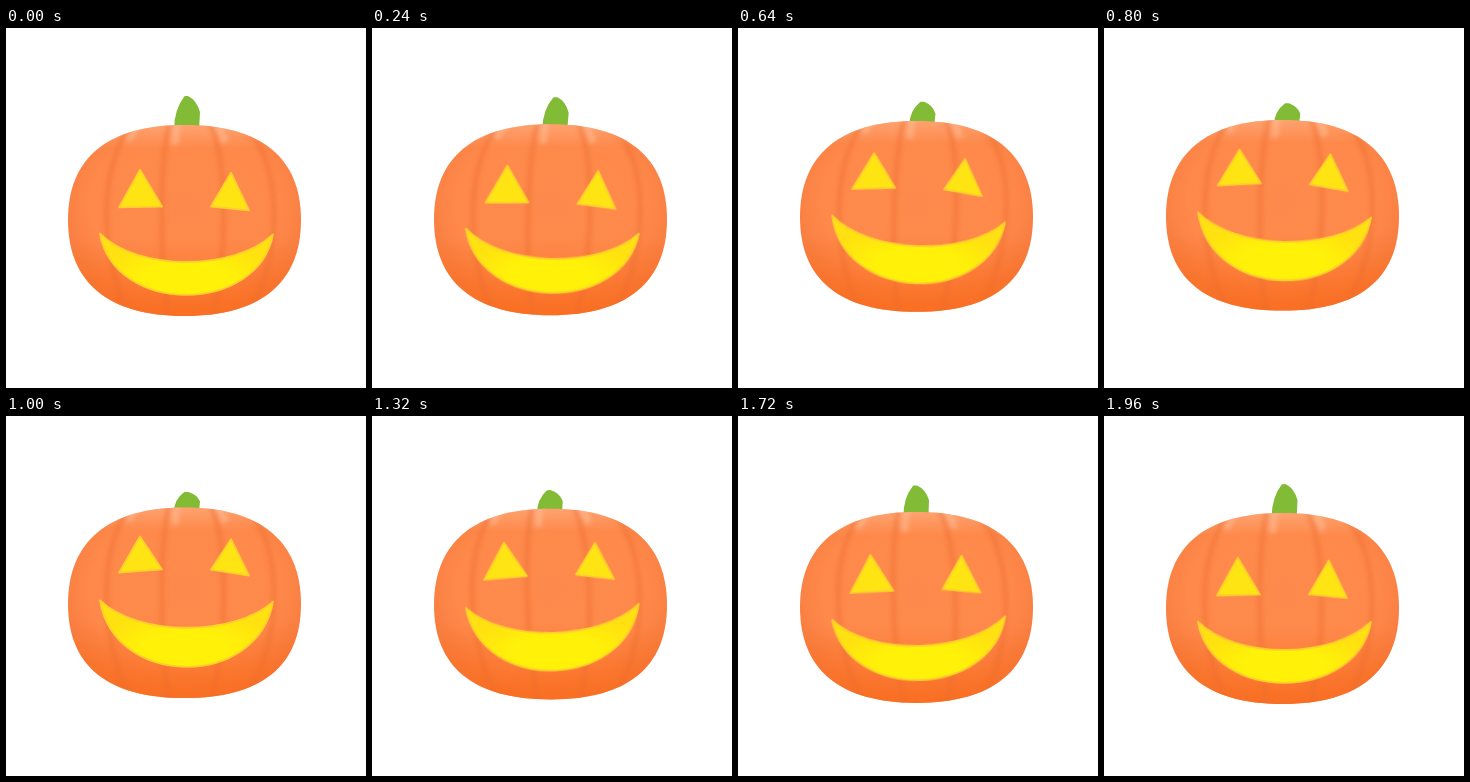
Write an HTML page that moves like this. It is 360 px wide and 360 px high and loops after 2 s.

```html
<!DOCTYPE html>
<html lang="en">
<head>
<meta charset="utf-8">
<title>Rocking pumpkin</title>
<style>
  html, body { margin: 0; width: 100%; height: 100%; overflow: hidden; background: #fff; }
  svg { display: block; width: 100vw; height: 100vh; }
  #ribs path { fill: none; stroke-linecap: round; }
  #ribs .dark { stroke: #ea6a2e; stroke-width: 5; opacity: .45; }
  #ribs .light { stroke: #ffc19c; stroke-width: 7; opacity: .5; stroke-dasharray: 22 400; }
  .face path { fill: #ffe414; stroke: #ffcf2c; stroke-width: 1.8; stroke-linejoin: round; }
  .face #mouth { fill: url(#glow); }
</style>
</head>
<body>
<svg viewBox="0 0 360 360">
  <defs>
    <radialGradient id="skin" cx=".5" cy=".42" r=".58">
      <stop offset="0" stop-color="#fd8a4c"/>
      <stop offset=".7" stop-color="#fe894b"/>
      <stop offset="1" stop-color="#f67a3c"/>
    </radialGradient>
    <linearGradient id="shade" x1="0" y1="0" x2="0" y2="1">
      <stop offset="0" stop-color="#ffb388" stop-opacity=".6"/>
      <stop offset=".12" stop-color="#ffb388" stop-opacity="0"/>
      <stop offset=".6" stop-color="#fa6c1c" stop-opacity="0"/>
      <stop offset="1" stop-color="#fa6c1c" stop-opacity=".8"/>
    </linearGradient>
    <radialGradient id="glow" cx=".5" cy=".7" r=".55">
      <stop offset=".4" stop-color="#fff208"/>
      <stop offset="1" stop-color="#ffe010"/>
    </radialGradient>
    <filter id="soft" filterUnits="userSpaceOnUse" x="40" y="70" width="280" height="240">
      <feGaussianBlur stdDeviation="2.2"/>
    </filter>
    <filter id="edge" filterUnits="userSpaceOnUse" x="40" y="70" width="280" height="240">
      <feGaussianBlur stdDeviation=".7"/>
    </filter>
    <clipPath id="clip"><path class="body"/></clipPath>
  </defs>
  <g class="tilt">
    <path id="stem" fill="#82bb36" stroke="#82bb36" stroke-width="2" stroke-linejoin="round"
          d="M-12 2Q-12-14-2-24H1Q9-21 12-12L11 2Z"/>
  </g>
  <path class="body" fill="url(#skin)"/>
  <path class="body" fill="url(#shade)"/>
  <g clip-path="url(#clip)">
    <g class="tilt" filter="url(#soft)"><g id="ribs"></g></g>
  </g>
  <g class="tilt face" filter="url(#edge)">
    <path id="eyeL"/>
    <path id="eyeR"/>
    <path id="mouth"/>
  </g>
</svg>
<script>
const LOOP = 2000, STEP = 40;
const CX = 178.5, CY = 190, RX = 116.5, RY = 96;
const byId = id => document.getElementById(id);
const setAll = (cls, name, value) =>
  document.querySelectorAll(cls).forEach(el => el.setAttribute(name, value));

// Face shapes at the middle of the nod: path commands with key points
const face = {
  eyeL: "M134,131 L113,168 L156,166 Z",
  eyeR: "M225,134 L205,166 L243,171 Z",
  mouth: "M94,195 C132,232 228,232 267,196 C252,280 108,280 94,195 Z"
};

// Points nearer the viewer travel further when the pumpkin nods
function nodPath(path, nod) {
  return path.replace(/([\d.]+),([\d.]+)/g, (_, x, y) => {
    const r2 = ((x - CX) / RX) ** 2 + ((y - CY) / RY) ** 2;
    return `${x},${+y + 13 * nod * (1 - .35 * r2)}`;
  });
}

function bodyPath(nod) {
  const mid = CY + 2 * nod, top = 94.3 + 2.8 * nod, low = 285 + 3 * nod;
  const left = CX - RX, right = CX + RX, reach = 62;
  return `M${left} ${mid}C${left} ${mid - reach} ${CX - 77} ${top} ${CX} ${top}` +
         `S${right} ${mid - reach} ${right} ${mid}` +
         `S${CX + 77} ${low} ${CX} ${low}S${left} ${mid + reach} ${left} ${mid}Z`;
}

function ribPath(longitude) {
  const d = RX * Math.sin(longitude), x = k => CX + k * d;
  return `M${x(.6)} 88C${x(1.1)} 125 ${x(1.1)} 225 ${x(.65)} 292`;
}

for (let i = 0; i < 4; i++) {
  const lon = -.75 + .55 * i;
  byId("ribs").innerHTML += `<path class="light" d="${ribPath(lon + .1)}"/>` +
                            `<path class="dark" d="${ribPath(lon)}"/>`;
}

function draw(time) {
  const angle = Math.floor(time % LOOP / STEP) * STEP / LOOP * 2 * Math.PI;
  const nod = Math.cos(angle), sway = Math.sin(angle);
  for (const id in face) byId(id).setAttribute("d", nodPath(face[id], nod));
  setAll(".body", "d", bodyPath(nod));
  setAll(".tilt", "transform", `rotate(${2 * sway} 180 196)`);
  byId("stem").setAttribute("transform", `translate(181 ${97 + 2.6 * nod}) scale(1 ${1 + .26 * nod})`);
  byId("ribs").setAttribute("transform", `translate(0 ${4 * nod})`);
}

const start = performance.now();
function tick() {
  draw(performance.now() - start);
  requestAnimationFrame(tick);
}
tick();
</script>
</body>
</html>
```
